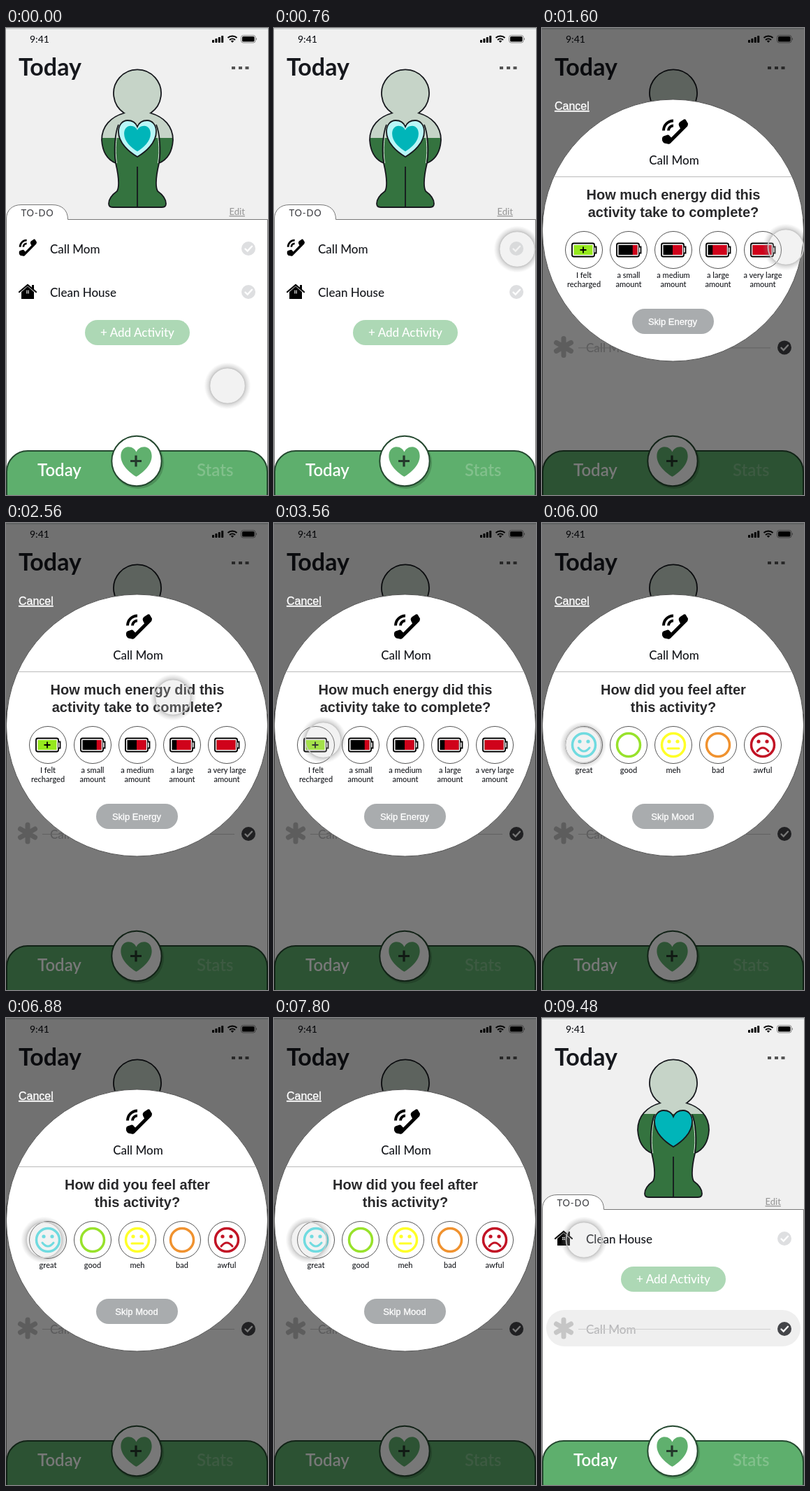
An HTML page that plays this animation: 375 by 667 pixels, repeating every 9500 ms.

```html
<!DOCTYPE html>
<html lang="en">
<head>
<meta charset="utf-8">
<style>
html, body { margin: 0; width: 100%; height: 100%; overflow: hidden; background: #efefef; }
svg { display: block; width: 375px; height: 667px; }
text { font: 500 17px Lato, sans-serif; fill: #16181d; }
.sans { font-family: "Liberation Sans", Arial, sans-serif; font-weight: 400; }
.light { fill: #fff; stroke: #fff; stroke-width: .3; }
.mid { text-anchor: middle; }
.line { fill: none; stroke-linecap: round; }
</style>
</head>
<body>
<svg id="stage" viewBox="0 0 375 667"></svg>
<script>
const LOOP = 9500;
const INK = '#16181d';
const HEART = 'M0 26C-12 19-27 6-27-10C-27-20-21-26-14-26C-7-26-2-22 0-17C2-22 7-26 14-26C21-26 27-20 27-10C27 6 12 19 0 26Z';
const BODY = 'M169 121.500A34 34 0 1 1 207 121.500C226 127 239 140 239 160C238 176 231 188 219 193C215 210 213 225 217 233' +
  'C224 238 229 243 229 251Q229 256 223 256H153Q147 256 147 251C147 243 152 238 159 233C163 225 161 210 157 193' +
  'C145 188 138 176 137 160C137 140 150 127 169 121.500Z';

const at = (x, y, inner, scale = 1) => `<g transform="translate(${x} ${y}) scale(${scale})">${inner}</g>`;
const label = (x, y, str, size = 17, style = '', attrs = '') =>
  `<text x="${x}" y="${y}" style="font-size:${size}px;${style}" ${attrs}>${str}</text>`;
const mid = (x, y, str, size, style) => label(x, y, str, size, style, 'class="mid"');
const check = (id, color) => `<g id="${id}"><circle r="10" fill="${color}"/>
  <path class="line" d="M-4.5 .5L-1.3 3.6L5-3.2" stroke="#fff" stroke-width="2.4"/></g>`;

const phone = `<path d="M7-14L13-18Q15-19 16-17L19-12Q19-10 18-8L-6 16Q-8 18-10 17L-15 16Q-17 15-18 12L-18 9Q-18 7-16 6L-10 4Q-8 4-7 6L-5 8L8-5L6-9Q5-12 7-14Z"/>
  <path d="M-16-2A14 14 0 0 1-2-16M-9-2A7 7 0 0 1-2-9" fill="none" stroke="#000" stroke-width="4"/>`;
const house = `<path d="M-9 0L0-8L9 0V10H-9Z"/><path d="M6-10H9V-4H6Z"/>
  <path class="line" d="M-12 0L0-10L12 0" stroke="#000" stroke-width="2.2"/>
  <path d="M-2-2H-.4V-.4H-2ZM.4-2H2V-.4H.4ZM-2 .4H-.4V2H-2ZM.4 .4H2V2H.4Z" fill="#fff"/>`;
const asterisk = `<path class="line" d="M0-12V12M-10.5-6L10.5 6M-10.5 6L10.5-6" stroke="#c6c6c6" stroke-width="7"/>`;

const statusBar = `<rect width="375" height="2" fill="#cdd1d1"/>
  ${label(34, 21, '9:41', 14)}
  ${[4, 6, 8, 10].map((h, i) => `<rect x="${295 + i * 4.4}" y="${21 - h}" width="3" height="${h}" rx=".8"/>`).join('')}
  <path d="M317.5 14A9.5 9.5 0 0 1 330.5 14M320 17A6 6 0 0 1 328 17" fill="none" stroke="#000" stroke-width="2.1"/>
  <path d="M321.8 18.6Q324 17 326.2 18.6L324 21Z"/>
  <rect x="336.5" y="10.5" width="20.5" height="10.5" rx="3" fill="none" stroke="#888"/>
  <rect x="338" y="12" width="17.5" height="7.5" rx="1.6"/><path d="M358 14Q360 15.7 358 17.5Z" fill="#777"/>`;

const arm = dx => `M${161 + dx} 138C${156 + dx} 150 ${154 + dx} 175 ${157 + dx} 193`;
const sides = dx => `<path d="${arm(dx)}"/><path d="${arm(dx)}" transform="matrix(-1 0 0 1 376 0)"/>`;
const figure = `<clipPath id="bodyClip"><path d="${BODY}"/></clipPath>
  <path d="${BODY}" fill="#c6d4c8"/>
  <rect id="level" x="130" width="120" height="130" fill="#34733f" clip-path="url(#bodyClip)"/>
  <g fill="none" stroke="#dce8de">${sides(1.6)}</g>
  <g fill="none" stroke="${INK}" stroke-width="1.8"><path d="${BODY}"/>${sides(0)}<path d="M188 198V256"/></g>
  ${at(188, 158, `<path d="${HEART}" fill="#b9f6f7"/><path id="heart" d="${HEART}" fill="#00b5b9"/>
    <path d="${HEART}" fill="none" stroke="${INK}" stroke-width="1.8"/>`)}`;

const list = `<path d="M.5 668V273C.5 260 9 252.5 22 252.5H66C80 252.5 88.5 260 88.5 273.5H374.5V668Z" fill="#fff" stroke="#777"/>
  ${label(21.5, 269, 'TO-DO', 13, 'fill-opacity:.8;letter-spacing:.8px')}
  <g id="first">${at(31, 314, phone, .68)}${label(63, 322, 'Call Mom')}
    ${at(347, 315, check('idle', '#dedfe1') + check('ticked', '#444549'))}</g>
  <g id="rest">${at(31, 315, house)}${label(63, 322, 'Clean House')}${at(347, 315, check('next', '#dedfe1'))}
    <rect x="113" y="355" width="150" height="36" rx="18" fill="#add8b5"/>
    ${mid(188, 379, '+ Add Activity', 17, 'fill:#fff')}</g>
  <g id="done"><rect id="pill" x="6" y="417" width="364" height="52" rx="26" fill="#efefef"/>
    ${at(31, 443, asterisk)}${label(63, 451, 'Call Mom', 17, 'fill-opacity:.26')}
    <path d="M52 444.5H327" stroke="#cfcfcf"/>${at(347, 444, check('past', '#444549'))}</g>`;

const nav = `<rect x="1" y="604" width="373" height="90" rx="30" fill="#5eaf6d" stroke="#24482f" stroke-width="2"/>
  ${label(45, 640, 'Today', 24, 'font-weight:600;fill:#fff')}
  ${label(273, 640, 'Stats', 24, 'font-weight:600;fill:#82c08c')}
  <circle cx="189" cy="621" r="37" opacity=".18"/>
  <circle cx="187" cy="618.5" r="35.7" fill="#fff" stroke="#24482f" stroke-width="2"/>
  ${at(186.5, 619.5, `<path d="${HEART}" fill="#60b06e"/>`, .82)}
  <path d="M186 610.5V626.5M178 618.5H194" stroke="#24382b" stroke-width="3.2"/>`;

const slots = draw => [0, 1, 2, 3, 4].map(i => at(60 + i * 64, 317,
  `<circle r="26.5" fill="#fff" stroke="#555"/>${draw(i)}`)).join('');
const battery = i => {
  const red = 27 * i / 4;
  return `<rect x="-17" y="-9.5" width="32" height="19" rx="2.5" fill="#fff" stroke="#000" stroke-width="1.8"/>
    <path d="M15-4.5H17.5V4.5H15" fill="#fff" stroke="#000" stroke-width="1.8"/>
    <rect x="-14.5" y="-7" width="27" height="14" fill="${i ? '#000' : '#96e91d'}"/>
    <rect x="${12.5 - red}" y="-7" width="${red}" height="14" fill="#d0021b"/>
    ${i ? '' : '<path d="M-1-4.5V4.5M-5.5 0H3.5" stroke="#000" stroke-width="1.8"/>'}`;
};
const moods = [
  ['great', '#50e0e6', 'M-8 4Q0 14 8 4'], ['good', '#98e22b'], ['meh', '#ffff28', 'M-8 5H8'],
  ['bad', '#f0922f'], ['awful', '#c21325', 'M-8 9Q0-1 8 9']
];
const face = i => {
  const [, color, mouth] = moods[i];
  return `<circle r="16.5" fill="none" stroke="${color}" stroke-width="3.5"/>` + (mouth ?
    `<g fill="${color}"><circle cx="-6" cy="-5" r="2.6"/><circle cx="6" cy="-5" r="2.6"/></g>
     <path class="line" d="${mouth}" stroke="${color}" stroke-width="3"/>` : '');
};
const title = (...rows) => rows.map((s, i) =>
  label(188, 245 + i * 25, s, 20, 'font-weight:700;fill:#29292b', 'class="sans mid"')).join('');
const skip = str => `<rect x="129" y="401" width="117" height="36" rx="18" fill="#a9acae"/>
  ${label(187, 424, str, 13, '', 'class="sans mid light"')}`;
const amounts = [['I felt', 'recharged'], ...['a small', 'a medium', 'a large', 'a very large'].map(s => [s, 'amount'])];

const popup = `<rect width="375" height="667" opacity=".53"/>
  ${label(18, 117, 'Cancel', 16, '', 'class="sans light" text-decoration="underline"')}
  <circle cx="187.5" cy="289" r="187" fill="#fff" stroke="#555"/>
  ${at(190, 148.5, phone)}${mid(189, 195, 'Call Mom', 17)}
  <path d="M17 212.5H358" stroke="#bbb"/>
  <g id="energy">${title('How much energy did this', 'activity take to complete?')}${slots(battery)}
    ${amounts.map((rows, i) => rows.map((s, j) => mid(60 + i * 64, 357 + j * 13, s, 11)).join('')).join('')}
    ${skip('Skip Energy')}</g>
  <g id="mood">${title('How did you feel after', 'this activity?')}${slots(face)}
    ${moods.map(([s], i) => mid(60 + i * 64, 357, s, 11)).join('')}${skip('Skip Mood')}</g>`;

const cursor = `<radialGradient id="glow"><stop offset=".72" stop-color="#777" stop-opacity=".42"/>
    <stop offset="1" stop-color="#999" stop-opacity="0"/></radialGradient>
  <mask id="ring"><rect x="-40" y="-40" width="80" height="80" fill="#fff"/><circle r="25" fill="#000"/></mask>
  <g id="cursor"><circle r="33.5" fill="url(#glow)" mask="url(#ring)"/>
    <circle r="25.5" fill="#cdcdcd" fill-opacity=".26" stroke="#cbcbcb" stroke-width="1.5"/></g>`;

document.getElementById('stage').innerHTML = `<rect width="375" height="667" fill="#f0f0f0"/>${statusBar}
  ${label(18, 68, 'Today', 34, 'font-weight:700')}
  <path d="M323 55h5v4h-5zM333 55h5v4h-5zM342.5 55h5v4h-5z" fill="#555"/>
  ${figure}
  ${label(319.5, 267, 'Edit', 13, 'fill:#999', 'text-decoration="underline"')}
  ${list}${nav}<g id="popup">${popup}</g>${cursor}`;

const $ = id => document.getElementById(id);
const ease = (t, start, length) => {
  const p = Math.min(1, Math.max(0, (t - start) / length));
  return p * p * (3 - 2 * p);
};
const fade = (id, value) => $(id).setAttribute('opacity', value);
const move = (id, value) => $(id).setAttribute('transform', value);

// time, x, y of the pointer
const path = [[0, 317, 511], [750, 348, 316], [1600, 349, 313], [2000, 340, 306], [2560, 239, 249], [3400, 80, 306],
  [3800, 53, 317], [4280, 53, 317], [6000, 59, 317], [7800, 50, 317], [8400, 58, 317], [9480, 60, 317], [LOOP, 60, 317]];
const pointer = t => {
  const i = path.findIndex(p => p[0] > t);
  const [a, b] = [path[i - 1], path[i]];
  const p = ease(t, a[0], b[0] - a[0]);
  return [a[1] + (b[1] - a[1]) * p, a[2] + (b[2] - a[2]) * p];
};
const press = t => [1000, 5200, 8550].reduce((s, c) => s - .12 * Math.max(0, 1 - Math.abs(t - c) / 120), 1);

function draw(now) {
  const t = now % LOOP;
  const lift = ease(t, 1380, 310);
  const swap = ease(t, 5300, 250);
  const close = ease(t, 8750, 250);
  const grow = ease(t, 9000, 350);
  const tick = ease(t, 1000, 120);

  fade('idle', 1 - tick);
  fade('ticked', tick);
  fade('first', 1 - ease(t, 1380, 150));
  fade('done', ease(t, 1380, 180));
  fade('pill', close);
  move('rest', `translate(0 ${62 * (1 - lift)})`);
  move('done', `translate(0 ${62 * (1 - lift)})`);

  fade('popup', ease(t, 1250, 250) * (1 - close));
  fade('energy', 1 - swap);
  fade('mood', swap);

  $('level').setAttribute('y', 157 - 20 * grow);
  move('heart', `scale(${.7 + .3 * grow})`);
  move('cursor', `translate(${pointer(t)}) scale(${press(t)})`);
}

const start = performance.now();
(function loop() {
  draw(performance.now() - start);
  requestAnimationFrame(loop);
})();
</script>
</body>
</html>
```
